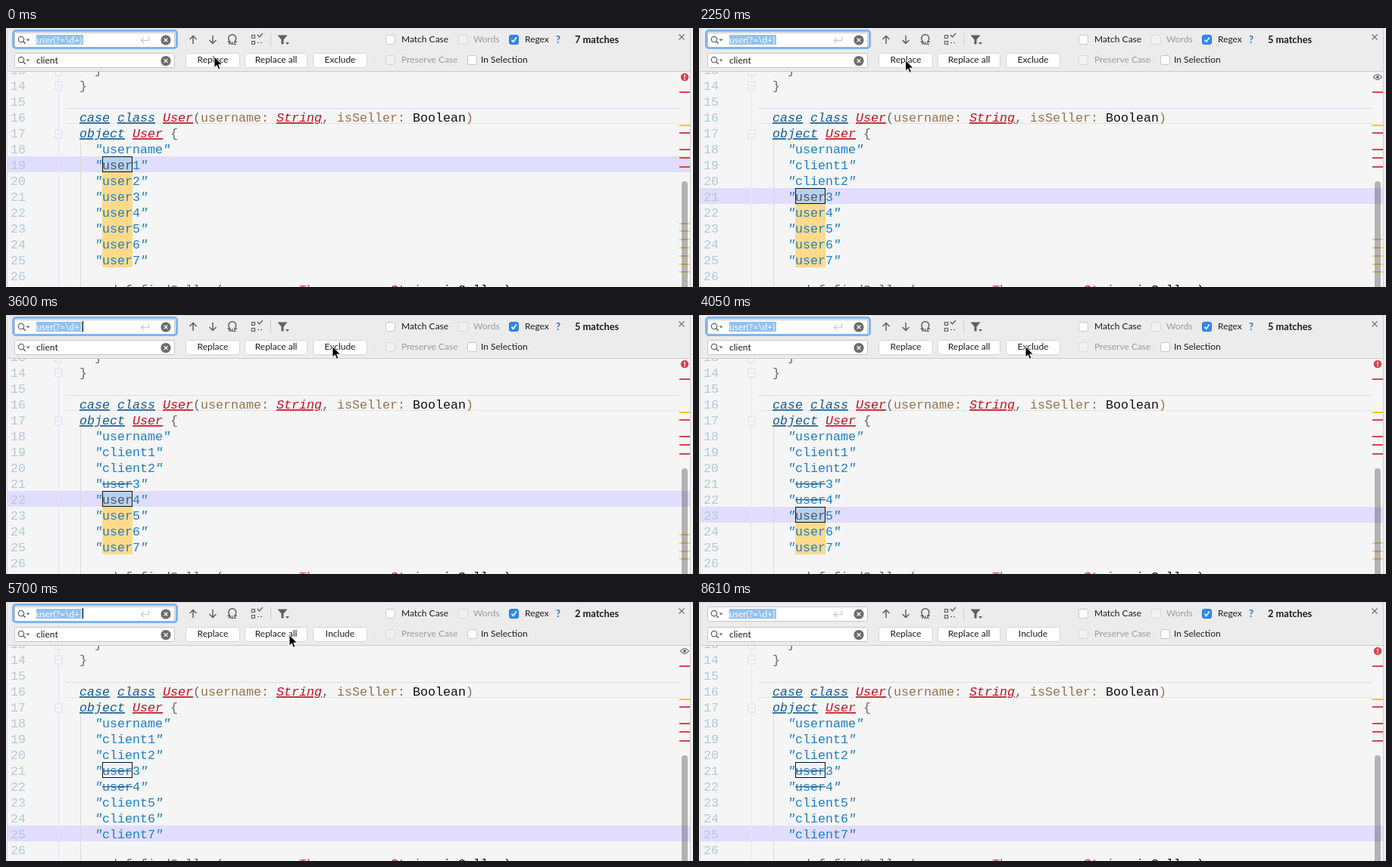
An HTML page for the animation above (8.71 s loop, 907 px wide and 343 px high).

```html
<!DOCTYPE html>
<html lang="en">
<head>
<meta charset="utf-8">
<title>Find and replace</title>
<style>
  html, body { margin: 0; width: 100%; height: 100%; overflow: hidden; background: #f5f5f5; }
  svg { display: block; width: 907px; height: 343px; }
  text { white-space: pre; }
  .code { font: 16.66px "Liberation Mono", "DejaVu Sans Mono", monospace; }
  .ui text { font: 12px Lato, "Open Sans", sans-serif; fill: #1c1c1c; }
  .ui .off { fill: #9b9b9b; }
  .ui .mid { text-anchor: middle; }
  .ui .count { font-size: 12.8px; font-weight: 700; }
  .ui .help { font-weight: 700; font-size: 13px; fill: #2574c4; }
  .ui .picked { fill: #fff; }
  .num { fill: #b3cad8; }
  .kw, .err { font-style: italic; text-decoration: underline; text-decoration-skip-ink: none; }
  .kw { fill: #155b95; }
  .err { fill: #c4101f; }
  .str { fill: #1c7fcb; }
  .quote { font-style: italic; }
  .sel { fill: #505660; }
  .par { fill: #97734c; }
  .dim { fill: #666; }
  .typ { fill: #111; }
  .pink { fill: #d8408c; }
  .icon { fill: none; stroke: #606060; stroke-width: 1.5; }
</style>
</head>
<body>
<svg viewBox="0 0 907 343">
  <defs>
    <g id="lens">
      <circle cx="20" cy="15" r="3.7" class="icon" style="stroke-width:1.2"/>
      <path d="M22.7 17.7l3 3" class="icon"/>
      <path d="M26.5 14.5h5l-2.5 3z" fill="#707070"/>
    </g>
    <g id="clear">
      <circle cx="211" cy="16" r="6.6" fill="#6c6c6c"/>
      <path d="M208.6 13.6l4.8 4.8m0-4.8l-4.8 4.8" stroke="#fff" stroke-width="1.3"/>
    </g>
    <path id="fold" d="M-4.5-5.5h9v11h-9z" fill="#f5f5f5" stroke="#dfdcf3"/>
  </defs>

  <rect width="907" height="343" fill="#f5f5f5"/>
  <rect id="line" x="2" width="901" height="21" fill="#e1ddfd"/>
  <path d="M69.5 58V343" stroke="#e6e3f5"/>
  <path d="M98.5 150V343" stroke="#dadada"/>
  <path d="M78 106.5H889" stroke="#dcd9f3"/>
  <path d="M78 126.5H889" stroke="#e2e2e6"/>
  <use href="#fold" x="69.5" y="57.5"/>
  <use href="#fold" x="69.5" y="76.5"/>
  <use href="#fold" x="69.5" y="140.5"/>
  <path d="M67 76.5h5M67 140.5h5" stroke="#dfdcf3"/>

  <g id="marks"></g>
  <rect id="box" x="127.5" width="39" height="20" stroke="#111"/>
  <g id="code" class="code"></g>

  <g id="stripes"></g>
  <rect x="892" y="203" width="8" height="150" rx="4" fill="#000" fill-opacity=".27"/>
  <g id="error">
    <circle cx="896" cy="65" r="5.2" fill="#d7434a"/>
    <path d="M896 61.7v4M896 67v1.5" stroke="#fff" stroke-width="1.5"/>
  </g>
  <g id="eye">
    <path d="M890.5 65q5.5-7 11 0q-5.5 7-11 0z" fill="none" stroke="#6c6c6c" stroke-width="1.2"/>
    <circle cx="896" cy="65" r="2" fill="#6c6c6c"/>
  </g>

  <g class="ui">
    <rect width="907" height="57" fill="#ececec"/>
    <path d="M0 57.5H904" stroke="#cbcbcb"/>
    <path d="M0 .5H904" stroke="#dcdaf0"/>

    <rect x="11.5" y="6.5" width="211" height="19" rx="1" fill="#fff" stroke="#c6c6c6"/>
    <rect id="ring" x="9.5" y="3.5" width="216" height="23" rx="3.5" fill="none" stroke="#82b4ea" stroke-width="3"/>
    <rect x="40" y="9" width="62" height="13" fill="#92c1f2"/>
    <text x="40" y="19.5" class="picked">user(?=\d+)</text>
    <rect id="caret" x="101" y="8" width="1" height="14" fill="#000"/>
    <path d="M188.5 11.5v5h-10m3.5-3.5l-3.5 3.5l3.5 3.5" fill="none" stroke="#c3c8ce" stroke-width="1.2"/>
    <use href="#lens"/>
    <use href="#clear"/>

    <rect x="11.5" y="33.5" width="211" height="19" rx="1" fill="#fff" stroke="#c6c6c6"/>
    <text x="40" y="47">client</text>
    <use href="#lens" y="27"/>
    <use href="#clear" y="27.5"/>

    <g class="icon">
      <path d="M247 21V10.5m-4.5 4.5l4.5-4.5l4.5 4.5"/>
      <path d="M273 10v10.5m-4.5-4.5l4.5 4.5l4.5-4.5"/>
      <path d="M295.5 17.5a5 5 0 1 1 6.5 0M292.5 18.2h3.5M301.5 18.2h3.5"/>
      <path d="M324.5 9.5h4v4h-4zM324.5 17.5h4v4h-4zM332 9l2.5 3l4.5-5M332 19.5h2m2 0h2" stroke-width="1.2"/>
    </g>
    <text x="299" y="22" class="mid" style="font-size:6px;font-weight:700">ALL</text>
    <path d="M349.5 7V24" stroke="#cfcfcf"/>
    <path d="M358.5 9.5h13l-5 6v6h-3v-6z" fill="#606060"/>
    <path d="M369 19h5l-2.5 3z" fill="#606060"/>
    <path d="M888.5 8.5l7 7m0-7l-7 7" stroke="#777" stroke-width="1.3"/>

    <g id="controls"></g>
    <text id="count" class="count" x="751" y="20"></text>
    <text class="help" x="726" y="19.5">?</text>
  </g>

  <rect width="1" height="343" fill="#f4f4f4"/>
  <path d="M1.5 0V343" stroke="#d5d5d5"/>
  <rect x="903" width="4" height="343" fill="#f0f0f0"/>
  <path d="M903.5 0V343" stroke="#cfcfcf"/>

  <path id="pointer" d="M0 0V14.5L3.3 11.4L5.5 16.8L7.9 15.8L5.7 10.5H10.4Z"
        fill="#000" stroke="#fff" stroke-width=".9"/>
</svg>

<script>
const LOOP = 8710, TICK = 150;
const $ = id => document.getElementById(id);

function add(parent, tag, attrs, text) {
  const el = document.createElementNS('http://www.w3.org/2000/svg', tag);
  for (const key in attrs) el.setAttribute(key, attrs[key]);
  if (text !== undefined) el.textContent = text;
  parent.append(el);
  return el;
}

const rowTop = n => 107 + (n - 16) * 21;
const write = (row, col, cls, text) =>
  add($('code'), 'text', { x: 97 + col * 10, y: rowTop(row) + 17, class: cls }, text);
const quote = text => add(text, 'tspan', { class: 'quote' }, '"');

// Editor text
for (let n = 13; n <= 26; n++)
  add($('code'), 'text', { x: 6, y: rowTop(n) + 17, class: 'num' }, n);

const lastRow = 26.85; // only the tops of its letters show
[
  [13, 2, 'dim', '}'], [14, 0, 'dim', '}'],
  [16, 0, 'kw', 'case'], [16, 5, 'kw', 'class'], [16, 11, 'err', 'User'],
  [16, 15, 'dim', '('], [16, 16, 'par', 'username:'], [16, 26, 'err', 'String'],
  [16, 32, 'dim', ','], [16, 34, 'par', 'isSeller:'], [16, 44, 'typ', 'Boolean'],
  [16, 51, 'par', ')'],
  [17, 0, 'kw', 'object'], [17, 7, 'err', 'User'], [17, 12, 'dim', '{'],
  [lastRow, 4, 'dim', 'def findSeller(username'], [lastRow, 29, 'pink', 'Throw'],
  [lastRow, 41, 'err', 'String'], [lastRow, 48, 'typ', 'isSeller)']
].forEach(item => write(...item));

function writeString(row, body) {
  const text = write(row, 2, 'str', '');
  quote(text);
  const word = add(text, 'tspan', {}, body);
  return { text, word };
}

quote(writeString(18, 'username').text);

const users = Array.from({ length: 7 }, (_, i) => {
  const top = rowTop(19 + i);
  const { text, word } = writeString(19 + i, 'user');
  add(text, 'tspan', {}, i + 1);
  quote(text);
  return {
    top, word,
    mark: add($('marks'), 'rect', { x: 127, y: top, width: 40, height: 21, fill: '#ffda8c' }),
    strike: add($('code'), 'rect', { x: 127, y: top + 11, width: 40, height: 1.3, fill: '#2f5f88' }),
    stripe: add($('stripes'), 'rect',
      { x: 889, y: Math.floor(258 + 10.83 * i), width: 14, height: 2, fill: '#f5cf78' })
  };
});

const stripe = (y, fill) => add($('stripes'), 'rect', { x: 889, y, width: 14, height: 2, fill });
[84, 138, 160, 171, 183].forEach(y => stripe(y, '#d9444e'));
stripe(128, '#f3c623');

// Search panel controls
function button(x, width, label) {
  add($('controls'), 'rect',
    { x: x + .5, y: 33.5, width: width - 1, height: 19, rx: 3, fill: '#fff', stroke: '#d6d6d6' });
  return add($('controls'), 'text', { x: x + width / 2, y: 46, class: 'mid' }, label);
}

function checkbox(x, y, labelX, label, state) {
  const on = state === 'on';
  add($('controls'), 'rect', {
    x: x + .5, y: y + .5, width: 12, height: 12, rx: 2.5,
    fill: on ? '#2f8af5' : state ? '#f1f1f1' : '#fff',
    stroke: on ? '#2478e0' : state ? '#d9d9d9' : '#c8c8c8'
  });
  if (on) add($('controls'), 'path', {
    d: `M${x + 3.5} ${y + 6.8}l2.3 2.6l4-6`, fill: 'none', stroke: '#fff', 'stroke-width': 1.7
  });
  add($('controls'), 'text', { x: labelX, y: y + 10.4, class: state === 'off' ? 'off' : '' }, label);
}

button(237, 72, 'Replace');
button(315, 83, 'Replace all');
const toggle = button(405, 72, 'Exclude');
checkbox(501, 9, 522, 'Match Case');
checkbox(597, 9, 617, 'Words', 'off');
checkbox(664, 9, 685, 'Regex', 'on');
checkbox(501, 36, 522, 'Preserve Case', 'off');
checkbox(609, 36, 627, 'In Selection');

// Start, current entry, entries (u: match, c: replaced, x: excluded), match count
const stages = [
  [0, 0, 'uuuuuuu', 7],
  [1050, 1, 'cuuuuuu', 6],
  [2250, 2, 'ccuuuuu', 5],
  [3600, 3, 'ccxuuuu', 5],
  [4050, 4, 'ccxxuuu', 5],
  [5700, 6, 'ccxxccc', 2]
];
const replaceTimes = [1050, 2250, 5700];

// Pointer stops: time, x, y
const path = [
  [0, 275, 38], [150, 272.5, 42.5], [2550, 272.5, 42.5], [3450, 431, 41.5],
  [4800, 431, 41.5], [5250, 374, 43.5], [6900, 374, 43.5], [7650, 855, 355]
];

function pointerAt(t) {
  const i = path.findIndex(p => p[0] > t);
  if (i < 0) return path[path.length - 1].slice(1);
  const [t0, x0, y0] = path[i - 1], [t1, x1, y1] = path[i];
  const k = (t - t0) / (t1 - t0), e = k * k * (3 - 2 * k);
  return [x0 + (x1 - x0) * e, y0 + (y1 - y0) * e];
}

const show = (el, on) => el.setAttribute('visibility', on ? 'visible' : 'hidden');

let shown;
function showStage(stage) {
  if (stage === shown) return;
  shown = stage;
  const [, current, entries, count] = stage;
  const active = entries[current] === 'u';
  users.forEach((user, i) => {
    const kind = entries[i], isCurrent = active && i === current;
    user.word.textContent = kind === 'c' ? 'client' : 'user';
    user.word.setAttribute('class', isCurrent ? 'sel' : 'str');
    show(user.mark, kind === 'u' && !isCurrent);
    show(user.strike, kind === 'x');
    show(user.stripe, kind === 'u');
  });
  $('line').setAttribute('y', users[current].top);
  $('box').setAttribute('y', users[active ? current : entries.indexOf('x')].top + .5);
  $('box').setAttribute('fill', active ? '#b6d1f0' : '#f0f1f7');
  $('count').textContent = count + ' matches';
  toggle.textContent = active ? 'Exclude' : 'Include';
}

function draw(t) {
  const tick = Math.floor(t / TICK + 1e-6) * TICK;
  showStage(stages.filter(s => s[0] <= tick).pop());

  const busy = replaceTimes.some(at => tick >= at && tick < at + 450);
  show($('eye'), busy);
  show($('error'), !busy);
  show($('caret'), tick < 8550 && Math.floor((tick + 50) / 500) % 2);
  show($('ring'), t < 8610);

  show($('pointer'), tick < 7650);
  $('pointer').setAttribute('transform', `translate(${pointerAt(tick)})`);
}

const start = performance.now();
function frame() {
  draw((performance.now() - start) % LOOP);
  requestAnimationFrame(frame);
}
frame();
</script>
</body>
</html>
```
